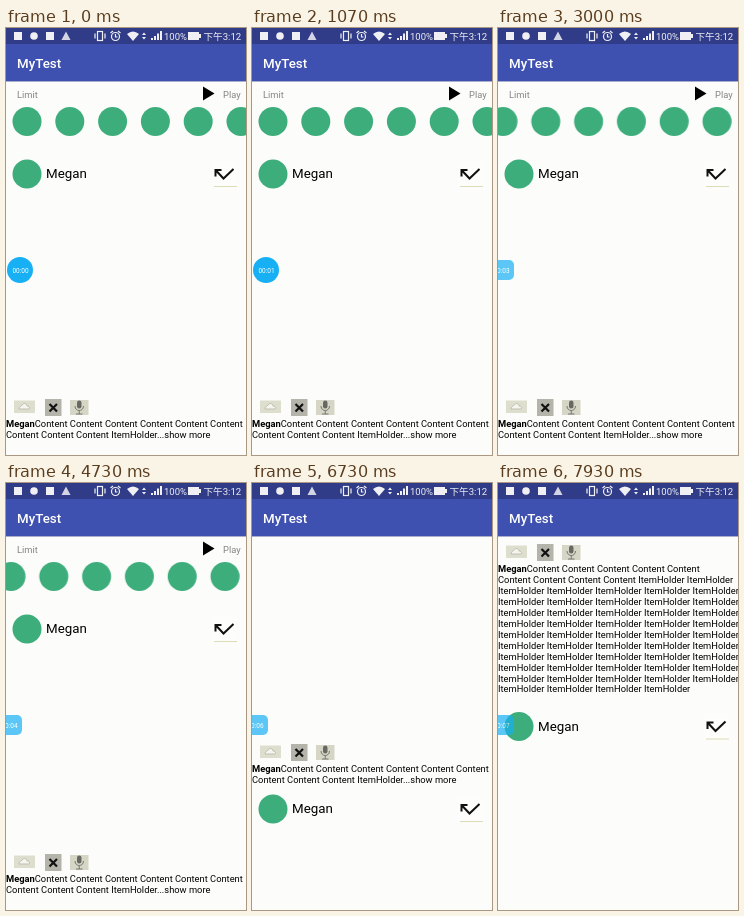
Recreate the animation shown at these times as an HTML page. Size 240 by 427 pixels, loop 8 s.

```html
<!DOCTYPE html>
<html lang="en">
<head>
<meta charset="utf-8">
<title>List demo</title>
<style>
html, body { margin: 0; width: 100%; height: 100%; overflow: hidden; background: #fcfcfa; }
svg { display: block; }
#stage { width: 240px; height: 427px; font-family: Roboto, "Noto Sans CJK TC", "Noto Sans CJK SC", sans-serif; }
.small { font-size: 9.33px; }
.big { font-size: 13.33px; }
.grey { fill: #858585; }
.bold { font-weight: 700; }

.page, .strip, .next, .short, .long, .pill, .digits, .clock {
  animation: 8s linear infinite;
}
.page { animation-name: scroll; }
.strip { animation-name: swipe; }
.next { animation-name: push; }
.short { animation-name: fade-out; }
.long { animation-name: fade-in; }
.clock { animation-name: dock; }
.pill { animation-name: shrink; }
.digits { animation-name: tick; animation-timing-function: steps(8); }

@keyframes scroll {
  0%, 62% { transform: translateY(0); animation-timing-function: ease-out; }
  71.6%, 75.4% { transform: translateY(-84px); animation-timing-function: ease-out; }
  81.6%, 96% { transform: translateY(-110px); }
  99.1%, 100% { transform: translateY(-310px); }
}
@keyframes swipe {
  0%, 15.3% { transform: translateX(0); animation-timing-function: ease-in-out; }
  22.5% { transform: translateX(-80.6px); }
  24.1%, 25.4% { transform: translateX(-83px); animation-timing-function: ease-out; }
  35.9%, 100% { transform: translateX(-187.2px); }
}
@keyframes push {
  0%, 62% { transform: translateY(298px); }
  71.6%, 87.4% { transform: translateY(290px); }
  89.1%, 100% { transform: translateY(407.5px); }
}
@keyframes fade-out {
  0%, 87.4% { opacity: 1; }
  89.1%, 100% { opacity: 0; }
}
@keyframes fade-in {
  0%, 87.4% { opacity: 0; }
  89.1%, 100% { opacity: 1; }
}
@keyframes dock {
  0%, 31% { transform: translateX(0); opacity: 1; }
  35%, 100% { transform: translateX(-11px); opacity: .7; }
}
@keyframes shrink {
  0%, 31% { y: 229px; height: 26px; rx: 13px; ry: 13px; }
  35%, 100% { y: 232px; height: 20px; rx: 5px; ry: 5px; }
}
@keyframes tick {
  from { transform: translateY(0); }
  to { transform: translateY(-80px); }
}
</style>
</head>
<body>
<svg id="stage" viewBox="0 0 240 427">
  <defs>
    <g id="head">
      <circle cx="21" cy="146" r="14.5" fill="#3dad7c"/>
      <text class="big" x="40" y="150">Megan</text>
      <rect x="206" y="134" width="25" height="24" fill="#fdfdfb"/>
      <path d="M208 158.500H231" stroke="#dcdcb8"/>
      <path d="M215.500 142H209.500V148.500M209.500 142L217.500 150.500L227.500 141" fill="none" stroke="#111" stroke-width="2"/>
    </g>
  </defs>
  <rect width="240" height="427" fill="#fcfcfa"/>

  <g class="page">
    <text class="small grey" x="11" y="69.500">Limit</text>
    <path d="M197 58.500V72.500L208.500 65.500Z"/>
    <text class="small grey" x="217" y="69.500">Play</text>
    <g class="strip" fill="#3dad7c"></g>
    <use href="#head"/>

    <!-- action buttons -->
    <rect x="8" y="372.500" width="21" height="12.500" fill="#dedece"/>
    <path d="M13 381C13 378 15.500 378.500 16 377C18 374.500 21 375.500 21 378C24 378 24 381 23 381Z" fill="#f5f5ee" stroke="#b4b4a6" stroke-width=".8"/>
    <rect x="39" y="371" width="16.500" height="17" fill="#b4b4aa"/>
    <path d="M43.500 376L51 383.500M51 376L43.500 383.500" stroke="#111" stroke-width="2.200"/>
    <rect x="64" y="372" width="18.500" height="15" fill="#d6d6c6"/>
    <rect x="71" y="372.500" width="4.500" height="8" rx="2.200" fill="#686862"/>
    <path d="M69 378C69 384 77.500 384 77.500 378M73.250 382.500V386M70 386H76.500" fill="none" stroke="#77776f"/>

    <g class="short small"></g>
    <g class="long small"></g>
    <g class="next"><use href="#head"/></g>
  </g>

  <!-- bars -->
  <rect width="240" height="16" fill="#303c88"/>
  <rect y="16" width="240" height="37" fill="#3f51b0"/>
  <rect y="53" width="240" height="1" fill="#a9aecb"/>
  <text class="big" x="11" y="40" fill="#fff" font-weight="500">MyTest</text>
  <g fill="#f0f0f4">
    <rect x="8" y="4" width="8" height="8"/>
    <circle cx="28" cy="8" r="3.800"/>
    <rect x="40" y="4" width="8" height="8"/>
    <path d="M60 3.500L64.500 12H55.500Z" opacity=".85"/>
    <path d="M121 6Q127 1 133 6L127 13Z"/>
    <path d="M136 7L138 4.500L140 7ZM136 9L138 11.500L140 9Z"/>
    <path d="M145 12V10H147V12ZM148 12V8H150V12ZM151 12V5.500H153V12ZM154 12V3H156V12Z"/>
    <path d="M182 4H193V6H195V10H193V12H182Z"/>
    <text x="158" y="12" font-size="9.500">100%</text>
    <text x="197.500" y="12" font-size="9.600">下午3:12</text>
  </g>
  <g fill="none" stroke="#f0f0f4" stroke-width="1.200">
    <rect x="91.500" y="3.500" width="5" height="9"/>
    <path d="M89 5.500V10.500M99 5.500V10.500"/>
    <circle cx="109.500" cy="8.500" r="4"/>
    <path d="M109.500 6V9H111.500M104.500 5L107 3M114.500 5L112 3"/>
  </g>

  <!-- floating clock -->
  <g class="clock">
    <rect class="pill" x="1" y="229" width="26" height="26" rx="13" fill="#17b0f4"/>
    <g fill="#fff" font-size="6.500">
      <text x="19" y="244.500" text-anchor="end">00:0</text>
      <svg x="19" y="237" width="5" height="10"><g class="digits"></g></svg>
    </g>
  </g>
</svg>
<script>
const $ = selector => document.querySelector(selector);
const times = (count, make) => Array.from({ length: count }, (_, i) => make(i)).join("");
const words = (word, count) => Array(count).fill(word).join(" ");

const name = '<tspan class="bold">Megan</tspan>';
const paragraph = lines =>
  lines.map((line, i) => `<text y="${399 + i * 10.95}">${line}</text>`).join("");

$(".strip").innerHTML = times(10, i => `<circle cx="${21 + i * 42.8}" cy="93.5" r="14.5"/>`);
$(".digits").innerHTML = times(8, i => `<text y="${7.5 + i * 10}">${i}</text>`);

$(".short").innerHTML = paragraph([
  name + words("Content", 6),
  words("Content", 3) + " ItemHolder...show more"
]);
$(".long").innerHTML = paragraph([
  name + words("Content", 5),
  words("Content", 4) + " " + words("ItemHolder", 2),
  ...Array(9).fill(words("ItemHolder", 5)),
  words("ItemHolder", 4)
]);
</script>
</body>
</html>
```
